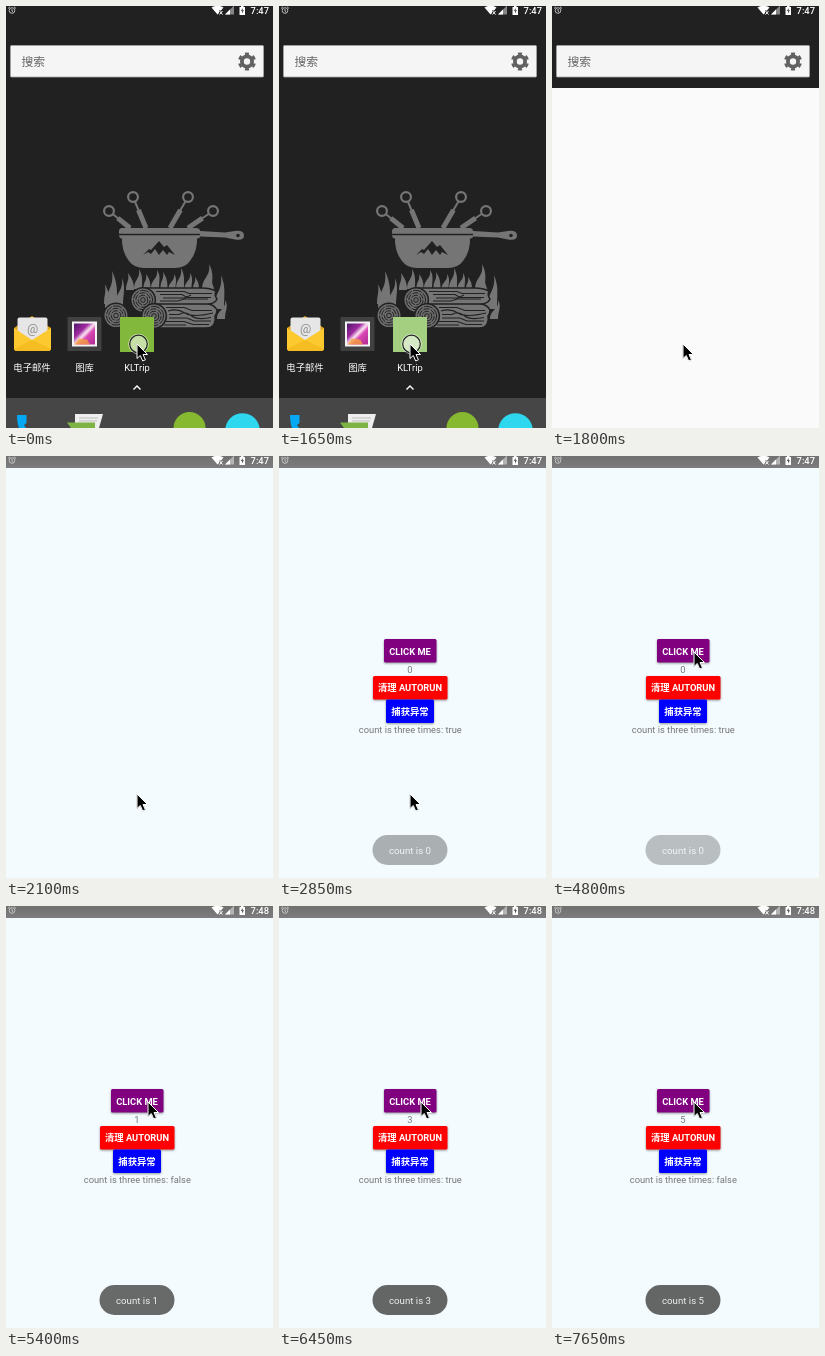
Recreate the animation shown at these times as an HTML page. Size 267 px wide and 422 px high, loop 8 s.

```html
<!DOCTYPE html>
<html lang="zh">
<head>
<meta charset="utf-8">
<style>
html, body { margin: 0; width: 100%; height: 100%; overflow: hidden; background: #212121; }
svg { display: block; width: 267px; height: 422px; }
text { font: 9.35px Roboto, 'Noto Sans CJK SC', 'Noto Sans CJK', sans-serif; }
.mid { text-anchor: middle; }
.btn text { font-weight: 700; fill: #fff; text-anchor: middle; }
.btn rect { filter: drop-shadow(0 1px 1px rgba(0,0,0,.4)); }
.line { fill: none; stroke: #757575; }
.cut { fill: none; stroke: #212121; }
</style>
</head>
<body>
<svg viewBox="0 0 267 422">
  <defs>
    <linearGradient id="photo" x1="0" y1="0" x2="1" y2="1">
      <stop offset="0" stop-color="#4b1768"/><stop offset=".35" stop-color="#a02aa0"/>
      <stop offset=".5" stop-color="#fbe6f2"/><stop offset=".62" stop-color="#d846b4"/>
      <stop offset="1" stop-color="#b02a90"/>
    </linearGradient>
    <linearGradient id="bar" x2="0" y2="1">
      <stop offset="0" stop-color="#707070"/><stop offset="1" stop-color="#7d7d7d"/>
    </linearGradient>
    <g id="log">
      <circle r="12.3" fill="#6c6c6c" stroke="#212121" stroke-width="1.600"/>
      <g class="cut" stroke-width="1">
        <circle r="9.600" stroke-dasharray="9 1.500"/><circle r="7.200" stroke-dasharray="6 1.500"/>
        <circle r="4.800" stroke-dasharray="7 1.500"/><circle r="2.300"/>
      </g>
    </g>
  </defs>

  <rect width="267" height="422" fill="#212121"/>

  <!-- Campfire wallpaper -->
  <g fill="#757575">
    <g id="skewers"></g>
    <path d="M116 222h74q4 0 4 3l25 1.500 10-1.500q9-1 9 4.500t-9 4l-10-2-25-1q0 2-4 2h-74q-3 0-3-4v-3q0-3.500 3-3.500z"/>
    <path d="M116 229h75q1 16-7 26-5 7-15 7h-31q-10 0-15-7-8-10-7-26z"/>
    <path class="cut" stroke-width="1.500" d="M113 228.500h81"/>
    <path fill="#212121" d="M137 249l6-6 2 1 8-9 5 6 3-2 8 10-6-3-2 3-4-5-4 5-4-6-4 5-3-2z"/>
    <circle cx="232" cy="229.500" r="1.800" fill="#212121"/>
    <g id="flames"></g>
    <g stroke="#212121" stroke-width="1.500">
      <path d="M138 282h58q8 0 14 3-2 4 1 8-2 5-10 5h-63zM150 298h50q8 0 11 6 0 4-2 6 1 5-1 8-2 4-8 4h-50z"/>
    </g>
    <g class="cut" stroke-width="1.100">
      <path d="M150 285.500h28l5 2h23M154 288.500h22l5 3h24M157 292h22l6-3M154 295h18l6-2h24"/>
      <path d="M160 301.500h18l8 3h20M162 305q9-3 17 2t28 0M163 308.500h10q6-4 12 1t20 2M163 312h18l7 3h17M160 315.500h18l9 3h16M158 319h22"/>
    </g>
    <use href="#log" transform="translate(137 294)"/>
    <use href="#log" transform="translate(110 309.500)"/>
    <use href="#log" transform="translate(148 310)"/>
  </g>

  <!-- Search bar -->
  <rect x="4.500" y="39.500" width="253" height="31.500" rx="1" fill="#f5f5f5" stroke="#a8a8a8" stroke-width=".8"/>
  <text x="15.500" y="60" fill="#666" style="font-size:11.8px">搜索</text>
  <g fill="none" stroke="#616161">
    <circle cx="241" cy="55.500" r="5.100" stroke-width="3.800"/>
    <circle cx="241" cy="55.500" r="7.800" stroke-width="2.600" pathLength="12" stroke-dasharray="1 1" stroke-dashoffset="1.500"/>
  </g>

  <!-- Shortcuts -->
  <path d="M8 322l18-12 19 12v20q0 3-3 3h-31q-3 0-3-3z" fill="#e0a21a"/>
  <rect x="11.500" y="311.500" width="30" height="26" rx="2" fill="#e6e6e6"/>
  <text x="26.500" y="327" class="mid" fill="#8c8c8c" style="font-size:12.5px">@</text>
  <path d="M8 322l18 12 19-12v20q0 3-3 3h-31q-3 0-3-3z" fill="#fcc92f"/>
  <path d="M8 343l18-9 19 9q-1 2-3 2h-31q-2 0-3-2z" fill="#f6bd22"/>
  <rect x="61.500" y="311" width="34" height="34" rx="1" fill="#414141"/>
  <rect x="66" y="315.500" width="25" height="25" fill="#f4f4f4"/>
  <rect x="68" y="317.500" width="21" height="21" fill="url(#photo)"/>
  <path d="M68 338.500l5-6 8 1 3 5z" fill="#f5a03c" opacity=".8"/>
  <rect id="app" x="114" y="311" width="34" height="35"/>
  <g fill="#fff" class="mid">
    <text x="26" y="365">电子邮件</text>
    <text x="78.500" y="365">图库</text>
    <text x="131" y="365">KLTrip</text>
  </g>
  <path d="M127.500 383.500l3.500-3.500 3.500 3.500" fill="none" stroke="#fff" stroke-width="1.400"/>

  <!-- Dock -->
  <rect y="392" width="267" height="30" fill="#464646"/>
  <path d="M11 409h9.500v8l-2.500 2 2 3h-7q-2-5-2-13z" fill="#03a9f4"/>
  <path d="M69 408h28l-4 14h-24z" fill="#eee"/>
  <path d="M73 412h19M73 415h18" stroke="#bdbdbd" stroke-width="1.200"/>
  <path d="M61 416.500h28v5.500h-24z" fill="#7cb342"/>
  <circle cx="183.500" cy="422" r="16" fill="#86b92f"/>
  <circle cx="236.500" cy="424.500" r="17.300" fill="#2ed6ee"/>

  <!-- Running app -->
  <rect id="page" width="267" height="422"/>
  <rect id="statusBar" width="267" height="12" fill="url(#bar)"/>
  <g id="content">
    <g class="btn">
      <rect x="105" y="183" width="52.500" height="23.500" rx="1.500" fill="#800080"/>
      <text x="131" y="198.500">CLICK ME</text>
      <rect x="94" y="220" width="74.500" height="23.500" rx="1.500" fill="#f00"/>
      <text x="131" y="235">清理 AUTORUN</text>
      <rect x="107" y="243.500" width="48" height="23.500" rx="1.500" fill="#00f"/>
      <text x="131" y="258.500">捕获异常</text>
    </g>
    <g fill="#777" class="mid">
      <text id="count" x="131" y="217"></text>
      <text id="triple" x="131.300" y="277"></text>
    </g>
  </g>
  <g id="toast">
    <rect x="93.500" y="379" width="75" height="30" rx="15" fill="#646666"/>
    <text id="note" x="131" y="397.500" class="mid" fill="#eee" style="font-size:9.7px"></text>
  </g>

  <!-- Status icons -->
  <g fill="none" stroke="#ccc" stroke-width=".9">
    <circle cx="6" cy="4.500" r="2.800"/><path d="M6 3v2l1 .8M2 2.500l2-1.800M10 2.500l-2-1.800"/>
  </g>
  <g fill="#fff">
    <path d="M205.500 1.500q6-3.500 12 0l-2.500 3h-2v2.500l-1.500 1.500z"/>
    <path d="M213.500 5l3 3.500m0-3.500l-3 3.500" stroke="#fff"/>
    <path d="M219 8.500l9-9v9z" opacity=".45"/><path d="M219 8.500l5-5v5z"/>
    <path d="M233.500 1h1.500v-1h2.500v1h1.500v8h-5.500z"/>
    <path d="M236.700 2l-2 3h1.300v2.500l2-3.300h-1.300z" fill="#555"/>
    <text id="clock" x="263" y="8.300" text-anchor="end" style="font-weight:500"></text>
  </g>

  <!-- Pointer -->
  <g id="pointer">
    <g id="ring">
      <circle cx="1.500" r="10.300" fill="#fff" fill-opacity=".55"/>
      <circle cx="1.500" r="8.800" fill="none" stroke="#222" stroke-width="1.200"/>
    </g>
    <path d="M0 0v14.500l3.300-3 2.400 5.500 2.700-1.200-2.400-5.300h4.500z" stroke="#fff"
      style="filter:drop-shadow(.5px .5px .7px rgba(0,0,0,.45))"/>
  </g>
</svg>
<script>
const $ = id => document.getElementById(id);
const STEP = 150, LOOP = 8000;
const clicks = [0, 1050, 1650, 5100, 5700, 6300, 6900, 7500];
const path = [[150, 318], [186, 262], [162, 223], [157, 217], [151, 208], [144, 199], [142, 196]];
const clamp = (v, lo, hi) => Math.max(lo, Math.min(hi, v));
const show = (id, on) => $(id).setAttribute('visibility', on ? 'visible' : 'hidden');

// Skewer: hollow ring, thin stick, thick handle running into the pot
const skewer = ([x, y, u, v]) => {
  const at = k => `${x + (u - x) * k} ${y + (v - y) * k}`;
  return `<path class="line" stroke-width="2" d="M${at(0)}L${at(1)}"/>
    <path class="line" stroke-width="5" d="M${at(.42)}L${at(1)}"/>
    <circle cx="${x}" cy="${y}" r="4.900" fill="#212121" stroke="#757575" stroke-width="2.200"/>`;
};
$('skewers').innerHTML = [[103, 205, 124, 222], [127, 191, 140, 222], [182, 191, 164, 222], [207, 205, 182, 222]]
  .map(skewer).join('');

// Flame tongue: centre, base, height, half width, sideways lean of the tip
const tongue = ([x, b, h, w, lean]) => `<path d="M${x - w} ${b}C${x - w} ${b - h * .5} ${x + lean + w * .4} ${b - h * .5}
  ${x + lean} ${b - h}C${x + lean + w} ${b - h * .65} ${x + w} ${b - h * .45} ${x + w} ${b}z"/>`;
$('flames').innerHTML = [
  [105, 302, 37, 6, 1], [113, 300, 28, 4, 3], [101, 298, 20, 3, -2],
  [124, 284, 17, 4, -2], [132, 283, 20, 4, 1], [141, 282, 14, 3.5, -1], [149, 282, 18, 4, 2],
  [158, 282, 16, 3.5, -1], [166, 283, 15, 3.5, 2], [174, 283, 21, 4, 1], [182, 283, 16, 3.5, 2], [190, 283, 12, 3, -1],
  [201, 284, 26, 5, 2], [205, 300, 30, 5, -2], [213, 303, 34, 5, 2], [215, 313, 19, 4, 4]
].map(tongue).join('');

function toastAlpha(t) {
  if (t < 2850) return 0;
  if (t < 4650) return Math.min(1, .5 + (t - 2850) / 400);
  if (t < 5250) return clamp(.8 - (t - 4650) / 375, 0, 1);
  return Math.min(1, .5 + (t - 5250) / 320);
}

function draw(now) {
  const t = Math.floor(now % LOOP / STEP) * STEP;
  const n = t < 5250 ? 0 : Math.min(5, 1 + Math.floor((t - 5250) / 600));

  $('app').setAttribute('fill', t === 1650 ? '#a5cf80' : '#82b83c');
  show('page', t >= 1800);
  $('page').setAttribute('y', t < 1950 ? 82 : 0);
  $('page').setAttribute('fill', t < 2100 ? '#fafafa' : '#f3fbff');
  show('statusBar', t >= 1950);
  show('content', t >= 2850);
  $('count').textContent = n;
  $('triple').textContent = `count is three times: ${n % 3 === 0}`;
  $('note').textContent = `count is ${n}`;
  $('toast').setAttribute('opacity', toastAlpha(t));
  $('clock').textContent = t < 4950 ? '7:47' : '7:48';

  const [x, y] = t < 3600 ? [131, 338] : path[Math.min(6, (t - 3600) / STEP)];
  $('pointer').setAttribute('transform', `translate(${x} ${y})`);
  show('ring', clicks.includes(t));
}

function tick() {
  draw(performance.now());
  requestAnimationFrame(tick);
}
tick();
</script>
</body>
</html>
```
